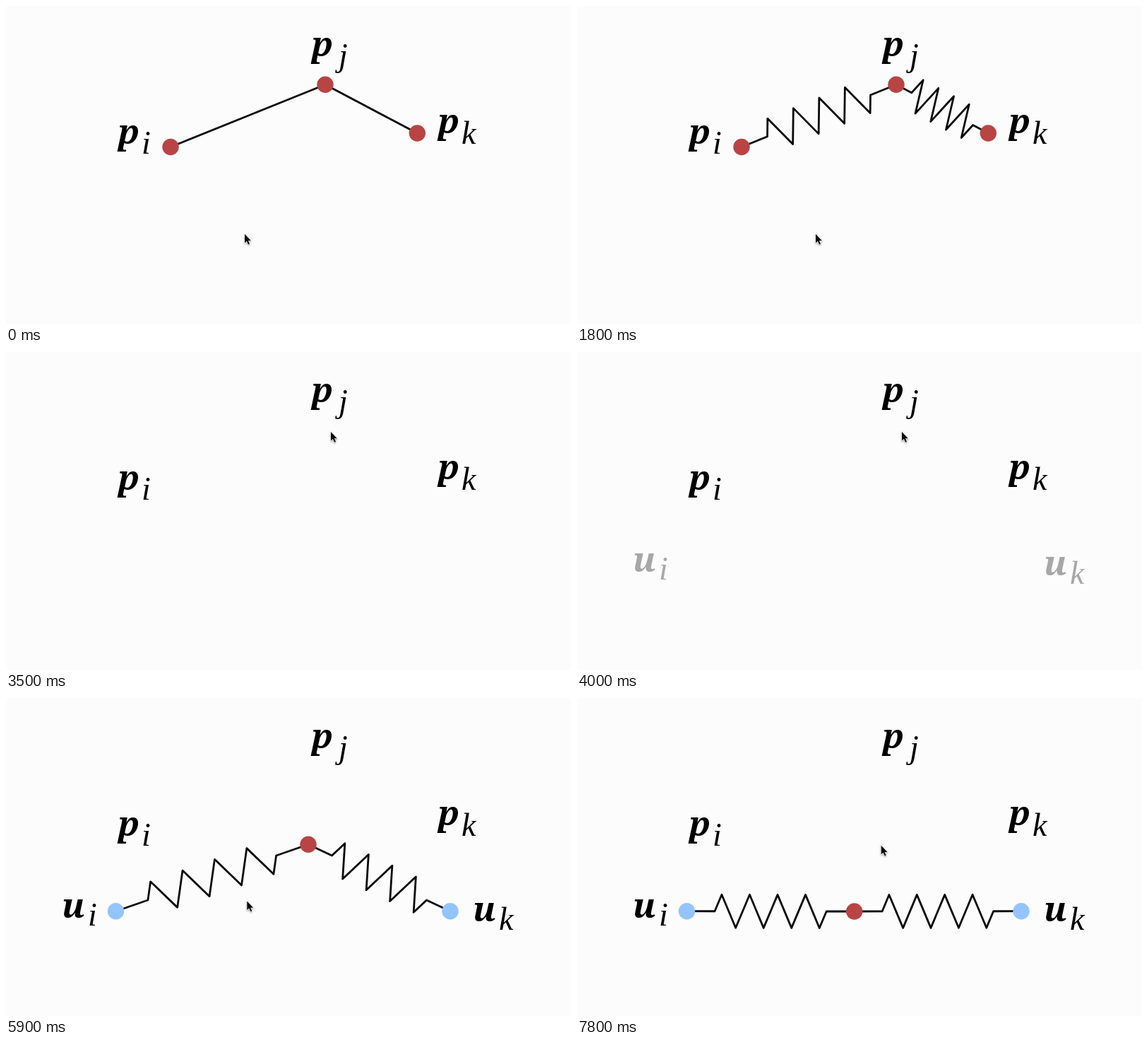
These frames come from a looping animation (800x450 px, 8000 ms). An HTML page:

```html
<!DOCTYPE html>
<html lang="en">
<head>
<meta charset="utf-8">
<title>Springs between points</title>
<style>
  html, body { margin: 0; width: 100%; height: 100%; overflow: hidden; background: #fcfcfc; }
  svg { display: block; width: 800px; height: 450px; }
  .base { font: italic bold 48px "Noto Serif", "Liberation Serif", serif; }
  .sub { font: italic 46px "Liberation Serif", serif; }
  polyline { fill: none; stroke: #080808; stroke-width: 2.8; stroke-linejoin: round; }
</style>
</head>
<body>
<svg id="stage" viewBox="0 0 800 450">
  <g id="p"></g>
  <g id="u"></g>
  <g id="straight"></g>
  <g id="springs"></g>
  <g id="stretched"></g>
  <g id="relaxed"></g>
  <path id="cursor" d="M0 0V12.6L2.9 10L5 14.8L7 14L5 9.3H8.8Z"
        fill="#080808" stroke="#fff" stroke-width="1.2" paint-order="stroke"
        style="filter: drop-shadow(0 1px 1px #0006)"/>
</svg>
<script>
const LOOP = 8000, STEP = 100, AMP = 23.5;
const RED = '#b94444', BLUE = '#93c4fd';
const $ = id => document.getElementById(id);

const label = (base, x, y, sub, sx, sy) =>
  `<text class="base" x="${x}" y="${y}">${base}</text><text class="sub" x="${sx}" y="${sy}">${sub}</text>`;
const dot = ([x, y], fill) => `<circle cx="${x}" cy="${y}" r="11.7" fill="${fill}"/>`;
const line = points => `<polyline points="${points.join(' ')}"/>`;

// Zigzag over the middle two thirds of the segment a-b
function spring(a, b) {
  const dx = b[0] - a[0], dy = b[1] - a[1], len = Math.hypot(dx, dy);
  const at = (f, h) => [a[0] + dx * f + dy / len * h, a[1] + dy * f - dx / len * h];
  const points = [a, at(1 / 6, 0)];
  for (let k = 0; k < 8; k++) points.push(at((5 + 2 * k) / 24, k % 2 ? -AMP : AMP));
  points.push(at(5 / 6, 0), b);
  return line(points);
}

const chain = (link, a, b, c, ends) =>
  link(a, b) + link(b, c) + dot(a, ends) + dot(b, RED) + dot(c, ends);

const pi = [233, 199.5], pj = [452, 111.3], pk = [582.3, 180];
const ui = [155.5, 301.7], uk = [629, 301.7];

$('p').innerHTML = label('p', 159, 195, 'i', 192, 209)
  + label('p', 433, 71, 'j', 471, 85) + label('p', 612, 180, 'k', 645, 195);
$('u').innerHTML = label('u', 79, 311, 'i', 116, 322) + label('u', 661, 316, 'k', 698, 328);
$('straight').innerHTML = chain((a, b) => line([a, b]), pi, pj, pk, RED);
$('springs').innerHTML = chain(spring, pi, pj, pk, RED);
$('stretched').innerHTML = chain(spring, ui, [428, 207.3], uk, BLUE);
$('relaxed').innerHTML = chain(spring, ui, [392.7, 302], uk, BLUE);

// Fade windows: [in start, in end, out start, out end]
const fades = {
  straight: [-1, 0, 300, 800],
  springs: [1200, 1800, 3300, 3500],
  u: [3900, 4200, 9000, 9100],
  stretched: [5000, 5400, 6500, 6700],
  relaxed: [6900, 7200, 9000, 9100]
};

// Pointer tip: [time, x, y]
const path = [
  [0, 338, 322.7], [2700, 338, 322.7], [2800, 366, 274], [2900, 430, 163], [3000, 460, 113],
  [5800, 460, 113], [5900, 341.3, 287.5], [6000, 342, 303], [6100, 362, 280],
  [6200, 408, 229], [6300, 430.7, 208.7], [LOOP, 430.7, 208.7]
];

const ramp = (t, a, b) => Math.min(1, Math.max(0, (t - a) / (b - a)));

function frame() {
  const t = Math.floor(performance.now() % LOOP / STEP) * STEP;
  for (const id in fades) {
    const [a, b, c, d] = fades[id];
    $(id).setAttribute('opacity', ramp(t, a, b) * (1 - ramp(t, c, d)));
  }
  const n = path.findIndex(k => k[0] > t), [t0, x0, y0] = path[n - 1], [t1, x1, y1] = path[n];
  const f = ramp(t, t0, t1);
  $('cursor').setAttribute('transform', `translate(${x0 + (x1 - x0) * f} ${y0 + (y1 - y0) * f})`);
  requestAnimationFrame(frame);
}
frame();
</script>
</body>
</html>
```
